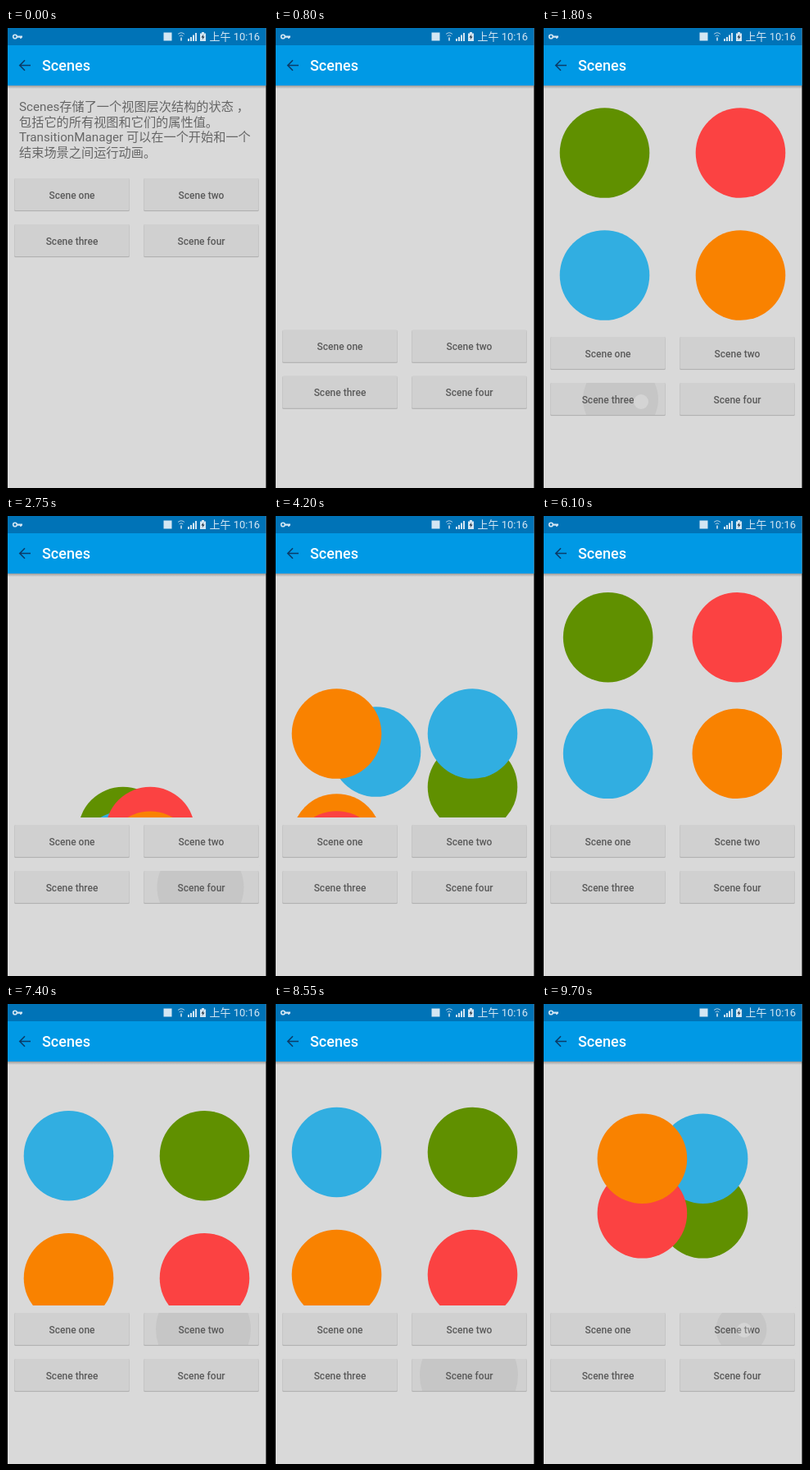
Animation, 320 px wide and 560 px high, one loop 9750 ms. Source, as an HTML page:

```html
<!DOCTYPE html>
<html lang="zh">
<head>
<meta charset="utf-8">
<title>Scenes</title>
<style>
html, body { margin: 0; width: 100%; height: 100%; overflow: hidden; background: #000; }
svg { display: block; width: 320px; height: 560px; }
text { font-family: Roboto, "Noto Sans CJK SC", "Noto Sans CJK", sans-serif; white-space: pre; }
.label { font-size: 12px; font-weight: 500; fill: #5a5a5a; text-anchor: middle; }
.intro { font-size: 15.2px; fill: #666; }
</style>
</head>
<body>
<svg viewBox="0 0 320 560">
  <defs>
    <clipPath id="scene"><rect x="2" y="70" width="315" height="297"/></clipPath>
    <linearGradient id="shade" x2="0" y2="1">
      <stop stop-color="#000" stop-opacity=".28"/>
      <stop offset="1" stop-color="#000" stop-opacity="0"/>
    </linearGradient>
  </defs>
  <rect width="320" height="560"/>
  <rect x="2" width="315.5" height="560" fill="#d9d9d9"/>
  <g id="intro" class="intro">
    <text x="16" y="101">Scenes存储了一个视图层次结构的状态 ，</text>
    <text x="16" y="119.7">包括它的所有视图和它们的属性值。</text>
    <text x="16" y="138.3">TransitionManager 可以在一个开始和一个</text>
    <text x="16" y="157">结束场景之间运行动画。</text>
  </g>
  <g id="stage" clip-path="url(#scene)"></g>
  <g id="buttons"></g>

  <rect x="2" y="70" width="315.5" height="4" fill="url(#shade)"/>
  <rect x="2" y="21" width="315.5" height="49" fill="#0099e5"/>
  <rect x="2" width="315.5" height="21" fill="#0073b7"/>
  <path d="M30 45.5H17M23 39.3L16.8 45.5L23 51.7" fill="none" stroke="#0b3c68" stroke-width="1.6"/>
  <text x="44" y="52" font-size="18" font-weight="500" fill="#fff">Scenes</text>

  <g fill="#d3e6f3">
    <path d="M13 9.5h7v2.2h-1v1h-2v-1h-4z"/>
    <circle cx="11" cy="10.5" r="2.3" fill="none" stroke="#d3e6f3" stroke-width="1.6"/>
    <rect x="192.500" y="5.500" width="10" height="10"/>
    <path d="M210 7.500q4-3.500 8 0M211.700 9.800q2.300-2 4.600 0" fill="none" stroke="#a5cbe4" stroke-width="1"/>
    <path d="M213 11.500h2v4h-2z" fill="#a5cbe4"/>
    <path d="M222 13h2v3h-2zM225 11h2v5h-2zM228 8.500h2v7.500h-2zM231 6h2v10h-2z"/>
    <path d="M239 5h3v1.500h2v9.500h-7v-9.500h2z"/>
    <path d="M241.500 7.500l-3 4h2l-1 3l3-4h-2z" fill="#123"/>
    <text x="248.500" y="15" font-size="13">上午 10:16</text>
  </g>
</svg>
<script>
const LOOP = 9750, STEP = 50;
const SHIFT = 193, MID_X = 159.5, MID_Y = 226.5, HALF_W = 83, HALF_H = 74.5;
const COLORS = { green: '#609000', blue: '#31aee1', red: '#fb4242', orange: '#f98200' };
const ORDER = ['green', 'blue', 'red', 'orange'];

// Colours in reading order: top left, top right, bottom left, bottom right.
const BASE = ['green', 'red', 'blue', 'orange'];
const TURN = ['blue', 'green', 'orange', 'red'];
const HALF = ['orange', 'blue', 'red', 'green'];
const SCATTER = { green: [0, 178], blue: [48, 135], red: [0, 130], orange: [0, 92] };

const LOW = 500;
const linear = p => p;
const out = p => 1 - (1 - p) * (1 - p);
const smooth = p => p * p * (3 - 2 * p);
const clamp = p => Math.max(0, Math.min(1, p));
const mix = (a, b, p) => a + (b - a) * p;

// Each key: time, spread, centre y, scatter, easing towards this key.
const ACTS = [
  { grid: BASE, keys: [
    [800, 1, LOW, 0], [1250, 1, MID_Y, 0, out],
    [1900, 1, MID_Y, 0], [2400, .2, 218, 0, smooth],
    [2600, .2, 218, 0], [2750, .2, 399.5, 0], [2850, .2, LOW, 0]] },
  { grid: TURN, keys: [
    [4000, 1, MID_Y, 2.25], [4600, 1, MID_Y, 0, out],
    [5500, 1, MID_Y, 0], [5750, 1, LOW, 0, smooth]] },
  { grid: HALF, keys: [
    [2850, 1, LOW, 0], [3300, 1, MID_Y, 0, out],
    [4050, 1, MID_Y, 0], [4200, 1, 339.5, 0], [4400, 1, LOW, 0]] },
  { grid: BASE, keys: [
    [5600, 1, LOW, 0], [6000, 1, MID_Y, 0, out], [6100, .95, 218.5, 0],
    [7120, .95, 218.5, 0], [7300, .95, LOW, 0, smooth]] },
  { grid: TURN, keys: [
    [7200, 1, 486.5, 0], [7510, 1, MID_Y, 0, out],
    [8500, 1, MID_Y, 0], [8750, 1, LOW, 0, smooth]] },
  { grid: HALF, keys: [
    [8700, 1, LOW, 0], [9150, 1, MID_Y, 0, out],
    [9300, 1, MID_Y, 0], [9700, .447, 221.5, 0], [LOOP, .4, 221, 0]] }
];

// Button index, time, ripple centre x, touch x and y relative to the button.
const TAPS = [
  [0, 250, 81, 82, 20], [2, 1570, 96, 121, 23], [3, 2485, 237.5, 238, 20],
  [1, 3750, 240, 240, 20], [2, 5300, 90, 90, 20], [1, 7110, 241, 241, 20],
  [3, 8250, 238, 238, 20], [1, 9545, 243.5, 247, 21]
];

const NS = 'http://www.w3.org/2000/svg';
const $ = id => document.getElementById(id);
function add(parent, tag, attrs) {
  const el = document.createElementNS(NS, tag);
  set(el, attrs);
  return parent.appendChild(el);
}
function set(el, attrs) {
  for (const k in attrs) el.setAttribute(k, attrs[k]);
}

for (const act of ACTS) {
  act.group = add($('stage'), 'g', {});
  act.dots = ORDER.map(name => ({
    name,
    slot: act.grid.indexOf(name),
    el: add(act.group, 'circle', { r: 54.8, fill: COLORS[name] })
  }));
}

const buttons = ['one', 'two', 'three', 'four'].map((word, i) => {
  const x = i % 2 ? 168.5 : 10.5, y = i < 2 ? 183 : 239;
  const g = add($('buttons'), 'g', { transform: `translate(0 ${y})` });
  const box = { x, y: 0, width: 140, height: 39, rx: 1.5 };
  add(g, 'rect', { ...box, x: x - .5, width: 141, height: 40.2, fill: '#c4c4c4' });
  add(g, 'rect', { ...box, y: 1, height: 39, fill: '#b1b1b1' });
  add(g, 'rect', { ...box, fill: '#d0d0d0' });
  const clip = add(g, 'clipPath', { id: 'b' + i });
  add(clip, 'rect', box);
  const ripple = add(g, 'circle', { cy: 20, fill: '#c6c6c6', 'clip-path': `url(#b${i})` });
  const label = add(g, 'text', { class: 'label', x: x + 70, y: 24.5 });
  label.textContent = 'Scene ' + word;
  const touch = add(g, 'circle', { r: 9, fill: '#fff', opacity: 0 });
  return { ripple, touch };
});

function pose(keys, t) {
  const n = keys.findIndex(k => k[0] > t);
  if (n < 1) return null;
  const a = keys[n - 1], b = keys[n];
  const p = (b[4] || linear)((t - a[0]) / (b[0] - a[0]));
  return [1, 2, 3].map(i => mix(a[i], b[i], p));
}

function drawAct(act, t) {
  const now = pose(act.keys, t);
  set(act.group, { display: now ? 'inline' : 'none' });
  if (!now) return;
  const [spread, y, loose] = now;
  for (const { name, slot, el } of act.dots) {
    const [dx, dy] = SCATTER[name];
    set(el, {
      cx: MID_X + (slot % 2 ? 1 : -1) * HALF_W * spread + dx * loose,
      cy: y + (slot < 2 ? -1 : 1) * HALF_H * spread + dy * loose
    });
  }
}

function drawTaps(t) {
  for (const b of buttons) {
    set(b.ripple, { r: 0 });
    set(b.touch, { opacity: 0 });
  }
  for (const [i, start, cx, tx, ty] of TAPS) {
    const age = t - start;
    if (age < 0 || age > 500) continue;
    set(buttons[i].ripple, { cx, r: age * .2, opacity: 1 - clamp((age - 300) / 200) });
    set(buttons[i].touch, { cx: tx, cy: ty, opacity: age < 250 ? .25 : 0 });
  }
}

function draw(t) {
  set($('intro'), { opacity: 1 - clamp((t - 400) / 200) });
  set($('buttons'), { transform: `translate(0 ${SHIFT * smooth(clamp((t - 450) / 400))})` });
  ACTS.forEach(act => drawAct(act, t));
  drawTaps(t);
}

const begin = performance.now();
function tick() {
  const t = (performance.now() - begin) % LOOP;
  draw(Math.floor(t / STEP) * STEP);
  requestAnimationFrame(tick);
}
draw(0);
requestAnimationFrame(tick);
</script>
</body>
</html>
```
